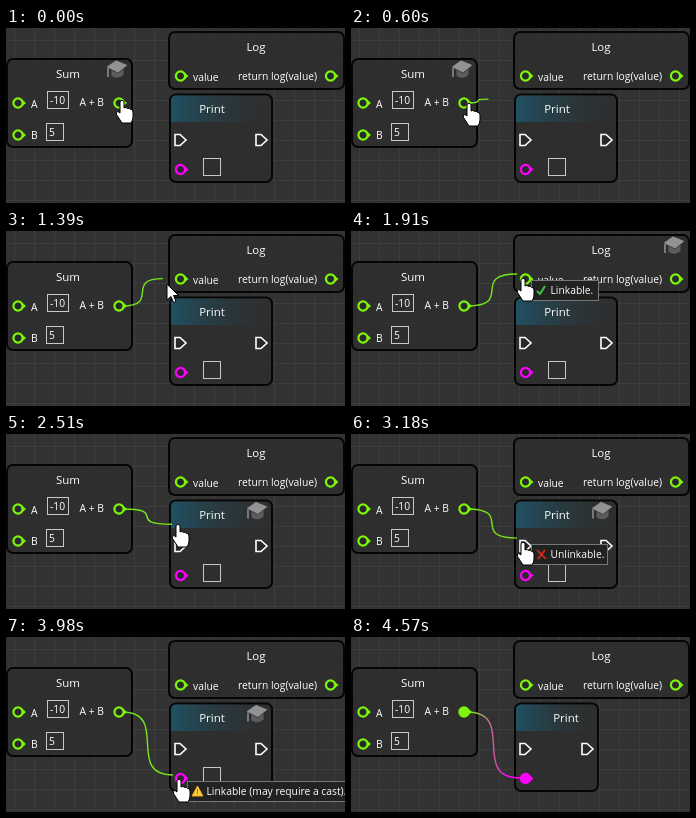
These frames come from a looping animation (339 px wide and 175 px high, 5190 ms). An HTML page:

```html
<!DOCTYPE html>
<html lang="en">
<head>
<meta charset="utf-8">
<title>Linking nodes</title>
<style>
  html, body { margin: 0; width: 100%; height: 100%; overflow: hidden; background: #323232; }
  svg { display: block; width: 339px; height: 175px; }
  text { font: 10.3px "Open Sans", "Noto Sans", sans-serif; fill: #fff; }
  .title { font-size: 11.5px; text-anchor: middle; }
  .node { fill: #2e2e2e; fill-opacity: .85; stroke: #050505; stroke-width: 2; }
  .field { fill: none; stroke: #c8c8c8; }
  .exec { fill: #292929; stroke: #fff; stroke-width: 1.6; }
  .cursor { fill: #fff; stroke: #000; stroke-linejoin: round; }
</style>
</head>
<body>
<svg viewBox="0 0 339 175">
  <defs>
    <pattern id="grid" width="20" height="20" x="8" y="12" patternUnits="userSpaceOnUse">
      <path d="M.5 0V20M0 .5H20" stroke="#3d3d3d"/>
    </pattern>
    <linearGradient id="header">
      <stop stop-color="#1f5163"/>
      <stop offset="1" stop-color="#2e2e2e" stop-opacity=".2"/>
    </linearGradient>
    <linearGradient id="wire" gradientUnits="userSpaceOnUse" x1="117" x2="158" y1="0" y2="0">
      <stop stop-color="#7cf50a"/>
      <stop offset="1" stop-color="#f0f"/>
    </linearGradient>
    <g id="cap" stroke="#2a2a2a" stroke-width=".7">
      <path d="M5 9V16Q12 21 18 15V8L12 12Z" fill="#5c5c5c"/>
      <path d="M0 7L10 0L22 5L12 13Z" fill="#929292"/>
      <path d="M2 8V17" stroke="#929292" stroke-width="1.5"/>
    </g>
  </defs>
  <rect width="339" height="175" fill="#323232"/>
  <rect width="339" height="175" fill="url(#grid)"/>
  <g id="scene"></g>
  <path id="cable" fill="none" stroke-width="1.4"/>
  <g id="pins"></g>
  <g id="tip">
    <rect height="20" x=".5" y=".5" fill="#222" stroke="#777"/>
    <g id="icon"></g>
    <text id="tipText" x="19.5" y="14"></text>
  </g>
  <path id="cursor" class="cursor"/>
</svg>
<script>
const LOOP = 5190, GRAB = 500, DROP = 4080, EXIT = 4560, CURSOR_LAG = 40;
const GREEN = '#7cf50a', PINK = '#f0f';
const HAND = 'M-2 1.5Q0-1 2 1.5V8Q4 6.5 5.5 8.5Q7.5 7.5 8.5 9.5Q11 9 11 12V17Q11 20 9 23H0L-5.5 14.5Q-6.5 11.5-4 11.5L-2 13Z';
const ARROW = 'M0 0V16L4 12.5L6.5 18.5L9 17.5L6.5 11.5H11.5Z';

const REST = { x: 116, y: 72 };
const MOVES = [
  { from: 150, to: 260, x: 116, y: 76 },
  { from: 550, to: 970, x: 142, y: 62, sweep: true },
  { from: 1020, to: 1700, x: 172, y: 47 },
  { from: 2190, to: 2700, x: 172, y: 108 },
  { from: 3180, to: 3550, x: 173, y: 142 },
  { from: 4480, to: EXIT, x: 178, y: 174 }
];

const CHECK = '<path d="M6 11L9 14L14 6" fill="none" stroke="#3ec43e" stroke-width="2"/>';
const CROSS = '<path d="M6 6L15 15M14 6L7 15" stroke="#d92b1c" stroke-width="1.7"/>';
const WARN = '<path d="M10.5 5L16 15H5Z" fill="#ffcf3a" stroke="#e0a820" stroke-linejoin="round"/><path d="M10.5 8V13" stroke="#a87a10"/>';
const TIPS = [
  { from: 1700, to: 2215, width: 68, text: 'Linkable.', icon: CHECK },
  { from: 2740, to: 3260, width: 77, text: 'Unlinkable.', icon: CROSS },
  { from: 3500, to: DROP, width: 166, text: 'Linkable (may require a cast).', icon: WARN }
];

const $ = id => document.getElementById(id);
const label = (x, y, s, cls = '') => `<text x="${x}" y="${y}" class="${cls}">${s}</text>`;
const field = (x, y, w) => `<rect class="field" x="${x}.5" y="${y}.5" width="${w}" height="17"/>`;
const box = n => `<rect class="node" x="${n.x}" y="${n.y}" width="${n.w}" height="${n.h}" rx="6"/>`;
const exec = x => `<path class="exec" d="M${x} 106.5h5l6 5.5l-6 5.5h-5Z"/>`;
const pin = (x, y, color, linked) =>
  `<g transform="translate(${x} ${y})" fill="${color}"><path d="M4-3.5L8 0L4 3.5Z"/>` +
  `<circle r="4.6" fill="${linked ? color : '#292929'}" stroke="${color}" stroke-width="2.2"/></g>`;
const show = (el, visible) => { el.style.display = visible ? '' : 'none'; };

function pointerAt(t) {
  let { x, y } = REST;
  for (const m of MOVES) {
    if (t <= m.from) break;
    const f = Math.min(1, (t - m.from) / (m.to - m.from));
    const eased = 1 - (1 - f) ** 1.5;
    x += (m.x - x) * eased;
    y += (m.y - y) * eased;
    if (m.sweep) {
      const swing = Math.sin(Math.PI * f) ** 2;
      x += 165 * swing;
      y += 85 * swing ** 2;
    }
  }
  return { x, y };
}

function nodesAt(linked) {
  return [
    { x: 1, y: 31, w: 125, h: 88 },
    { x: 163, y: 4, w: 175, h: 57 },
    { x: 164, y: 66.5, w: linked ? 83 : 102, h: 87.5 }
  ];
}

function sceneMarkup(nodes, hovered, linked) {
  const right = nodes[2].x + nodes[2].w;
  const cap = hovered ? `<use href="#cap" x="${hovered.x + hovered.w - 26}" y="${hovered.y + 1}"/>` : '';
  return nodes.map(box).join('') +
    `<path d="M165 94V73Q165 67.5 170 67.5H${right - 6}q5 0 5 5V94Z" fill="url(#header)"/>` +
    label(62, 50, 'Sum', 'title') + label(250, 23, 'Log', 'title') +
    label(linked ? 215 : 206, 85, 'Print', 'title') +
    label(25, 80, 'A') + label(25, 111, 'B') + label(73.5, 77.5, 'A + B') +
    field(41, 63, 21) + label(44, 76, '-10') +
    field(40, 95, 17) + label(43, 108, '5') +
    label(187, 53, 'value') + label(232, 51.5, 'return log(value)') +
    exec(169) + exec(right - 16) + (linked ? '' : field(197, 130, 17)) + cap;
}

function pinMarkup(linked) {
  return pin(12, 75, GREEN) + pin(12, 107, GREEN) + pin(113, 75, GREEN, linked) +
    pin(174.5, 48, GREEN) + pin(324.5, 48, GREEN) + pin(174.5, 141.5, PINK, linked);
}

function drawCable(t, linked) {
  const p = pointerAt(t);
  const [x, y] = linked ? [169, 141] : [p.x - 6, p.y - 4];
  const startX = 116, bend = Math.abs(x - startX) * .95;
  $('cable').setAttribute('d', `M${startX} 75C${startX + bend} 75 ${x - bend} ${y} ${x} ${y}`);
  $('cable').setAttribute('stroke', linked ? 'url(#wire)' : '#76e51a');
  show($('cable'), t > GRAB);
}

function drawTip(t, p) {
  const tip = TIPS.find(k => t >= k.from && t < k.to);
  show($('tip'), tip);
  if (!tip) return;
  $('tip').setAttribute('transform', `translate(${Math.round(p.x + 8)} ${Math.round(p.y + 1.5)})`);
  $('tip').firstElementChild.setAttribute('width', tip.width - 1);
  $('icon').innerHTML = tip.icon;
  $('tipText').textContent = tip.text;
}

function drawCursor(t, p, hovered) {
  show($('cursor'), t < EXIT);
  $('cursor').setAttribute('d', hovered ? HAND : ARROW);
  $('cursor').setAttribute('transform', `translate(${Math.round(p.x)} ${Math.round(p.y)})`);
}

let sceneKey = '';

function draw(t) {
  const linked = t >= DROP, nodes = nodesAt(linked), p = pointerAt(t - CURSOR_LAG);
  const inside = n => p.x >= n.x && p.x <= n.x + n.w && p.y >= n.y && p.y <= n.y + n.h;
  const hovered = t < EXIT && nodes.find(inside);
  const key = `${linked}/${nodes.indexOf(hovered)}`;
  if (key !== sceneKey) {
    $('scene').innerHTML = sceneMarkup(nodes, hovered, linked);
    $('pins').innerHTML = pinMarkup(linked);
    sceneKey = key;
  }
  drawCable(t, linked);
  drawTip(t, p);
  drawCursor(t, p, hovered);
}

const start = performance.now();
function tick() {
  draw((performance.now() - start) % LOOP);
  requestAnimationFrame(tick);
}
tick();
</script>
</body>
</html>
```
